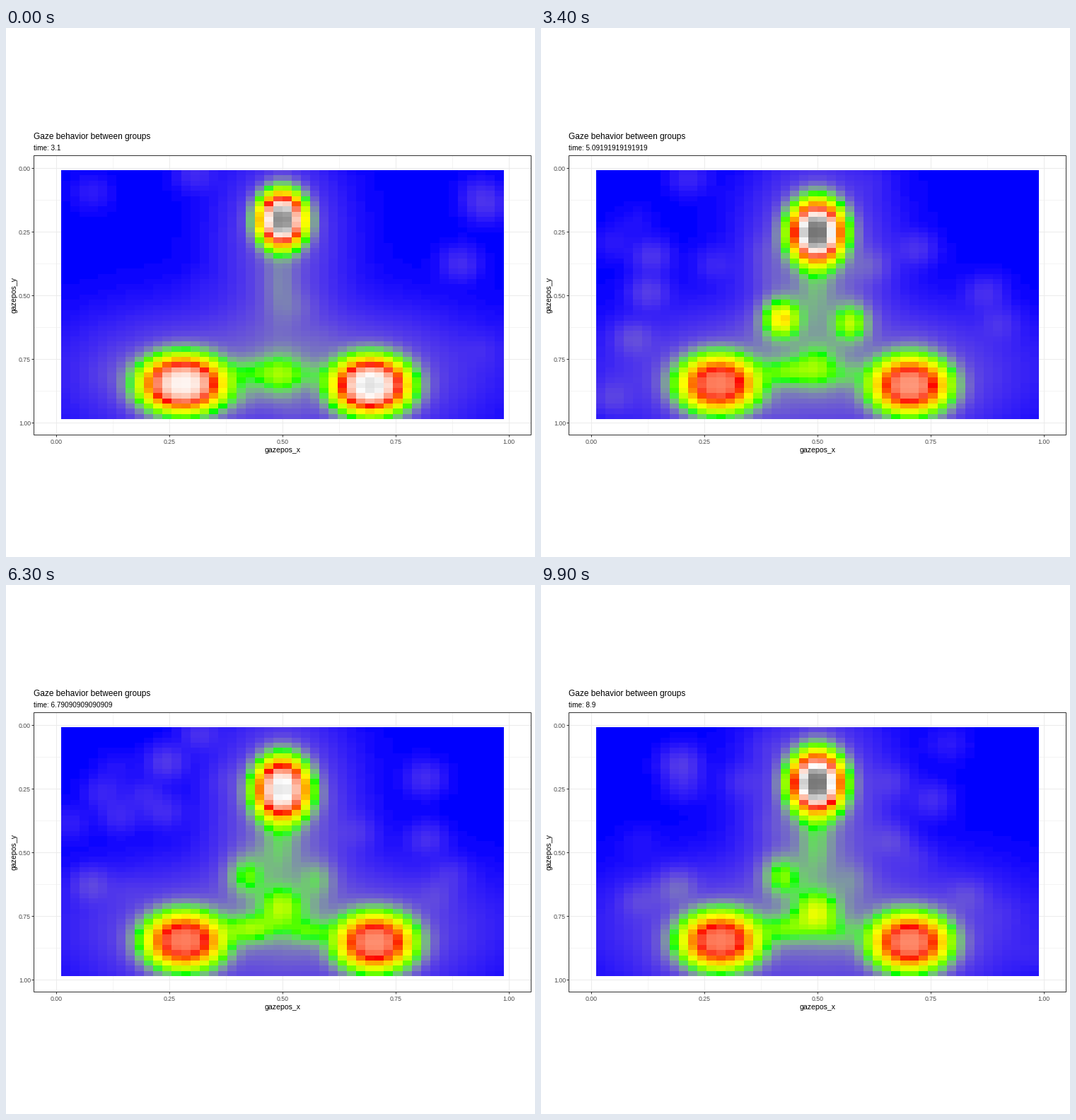
These frames come from a looping animation (748 px wide and 748 px high, 10000 ms). A matplotlib script:

```python
import numpy as np
import matplotlib.pyplot as plt
from matplotlib.animation import FuncAnimation
from matplotlib.patches import Rectangle

SIZE, DPI, FRAMES = 748, 100, 100
PX = 72 / DPI  # points per pixel
plt.rcParams["font.family"] = "Liberation Sans"

# ---- colour scale: named colours mixed in CIELAB
RGB2XYZ = np.array([[.4124, .3576, .1805], [.2126, .7152, .0722], [.0193, .1192, .9505]])
WHITE = RGB2XYZ.sum(axis=1)


def to_lab(rgb):
    lin = np.where(rgb > .04045, ((rgb + .055) / 1.055) ** 2.4, rgb / 12.92)
    t = lin @ RGB2XYZ.T / WHITE
    f = np.where(t > .008856, np.cbrt(t), 7.787 * t + 16 / 116)
    return np.stack([116 * f[:, 1] - 16, 500 * (f[:, 0] - f[:, 1]),
                     200 * (f[:, 1] - f[:, 2])], axis=1)


def to_rgb(lab):
    fy = (lab[:, 0] + 16) / 116
    f = np.stack([fy + lab[:, 1] / 500, fy, fy - lab[:, 2] / 200], axis=1)
    t = np.where(f > .2069, f ** 3, (f - 16 / 116) / 7.787)
    lin = np.clip((t * WHITE) @ np.linalg.inv(RGB2XYZ).T, 0, 1)
    return np.clip(np.where(lin > .0031308, 1.055 * lin ** (1 / 2.4) - .055, 12.92 * lin), 0, 1)


def lab_ramp(names, n=1024):
    stops = to_lab(np.array([plt.matplotlib.colors.to_rgb(c) for c in names]))
    pos = np.linspace(0, 1, len(names))
    mix = [np.interp(np.linspace(0, 1, n), pos, channel) for channel in stops.T]
    return to_rgb(np.stack(mix, axis=1))


LUT = lab_ramp(["blue", "lime", "yellow", "red", "white", "black"])

# ---- density field, positions in pixels
CELLS = 48
HEAT_L, HEAT_R, HEAT_T, HEAT_B = 78, 704, 201, 553
mid = (np.arange(CELLS) + .5) / CELLS
GX, GY = np.meshgrid(HEAT_L + (HEAT_R - HEAT_L) * mid, HEAT_T + (HEAT_B - HEAT_T) * mid)


def bump(x, y, w, h, amp, power=1.0):
    """Bell with half-widths w and h; a higher power flattens the top."""
    q = ((GX - x) / w) ** 2 + ((GY - y) / h) ** 2
    return amp * np.exp(-np.log(2) * q ** power)


def ease(s, *points):
    t, v = zip(*points)
    return np.interp(s, t, v)


def hot_spots(s):
    """Face at the top and the two hands below."""
    grow = ease(s, (0, 0), (.3, 1))
    top_y = ease(s, (0, 271), (.3, 289), (.8, 289), (1, 280))
    top_amp = .87 + .055 * np.cos(2 * np.pi * (s - .2) / .95)
    left_amp = .67 + .12 * np.exp(-s / .08)
    right_amp = ease(s, (0, .82), (.2, .79), (.35, .69), (1, .68))
    return [(390, top_y, 32 + 5 * grow, 38 + 5 * grow, top_amp),
            (250 + 3 * s, 503, 57 - 4 * grow, 38, left_amp),
            (516 + 6 * grow, 505, 52, 38, right_amp)]


def soft_spots(s):
    """Glances between the hot spots, and the haze around them."""
    haze = ease(s, (0, .03), (.2, .06))
    left = ease(s, (.2, 0), (.34, .40), (.63, .17), (1, .19))
    right = ease(s, (.2, 0), (.34, .26), (.63, .10), (1, .04))
    mid_y = ease(s, (0, 490), (.2, 474), (.4, 482), (.63, 456), (1, 463))
    mid_amp = ease(s, (0, .20), (.2, .14), (.63, .22), (.75, .29), (1, .28))
    return [(391, 400, 62, 110, haze),
            (391, 480, 210, 55, .03),
            (388, 362, 19, 45, .05 + .04 * s),
            (340, 411, 20, 21, left),
            (438, 417, 19, 20, right),
            (389, mid_y, 24, 23, mid_amp),
            (345, 486, 28, 16, ease(s, (0, .11), (.63, .21), (1, .16))),
            (430, 490, 26, 14, .09 + .05 * np.sin(2 * np.pi * (s - .4)))]


# stray glances: short-lived, rare in the upper right
rng = np.random.default_rng(7)
STRAYS = [(b, x, y, a) for b, x, y, a in zip(rng.uniform(-8, FRAMES + 8, 220),
                                             rng.uniform(80, 700, 220),
                                             rng.uniform(205, 550, 220),
                                             rng.uniform(.012, .035, 220))
          if x < 480 or y > 390 or rng.random() < .35]


def density(i):
    s = i / (FRAMES - 1)
    hot, soft = 0, 0
    for x, y, w, h, amp in hot_spots(s):
        hot = hot + bump(x, y, w, h, amp, 1.6)
        soft = soft + bump(x, y, 1.7 * w, 1.7 * h, .035)
    for spot in soft_spots(s):
        soft = soft + bump(*spot)
    for born, x, y, amp in STRAYS:
        life = 1 - abs(i - born) / 7
        if life > 0:
            soft = soft + bump(x, y, 21, 18, amp * life)
    return hot + soft * np.clip(1 - 2 * hot, 0, 1)


def heat(i):
    v = np.clip(density(i), 0, 1)
    return LUT[np.rint(v * (len(LUT) - 1)).astype(int)]


# ---- plot furniture
fig = plt.figure(figsize=(SIZE / DPI, SIZE / DPI), dpi=DPI, facecolor="white")
ax = fig.add_axes([0, 0, 1, 1])
ax.axis("off")
L, R, T, B = 39.5, 742.5, 180, 575
X0, XW, Y0, YH = 71.3, 640, 197.6, 360


def line(xs, ys, color, width=1.0):
    ax.plot(xs, ys, color=color, lw=width * PX, zorder=1, solid_capstyle="butt")


def label(x, y, s, px, color="black", va="baseline", **kw):
    return ax.text(x, y, s, fontsize=px * PX, color=color, va=va, **kw)


for k in range(9):
    f = k / 8
    x, y = X0 + XW * f, Y0 + YH * f
    major = k % 2 == 0
    line([x, x], [T, B], "#ebebeb", 1 if major else .5)
    line([L, R], [y, y], "#ebebeb", 1 if major else .5)
    if major:
        line([x, x], [B, B + 3], "#333333")
        line([L - 3, L], [y, y], "#333333")
        label(x, 588, f"{f:.2f}", 8.8, "#4d4d4d", ha="center")
        label(35, y + 4, f"{f:.2f}", 8.8, "#4d4d4d", ha="right")

ax.add_patch(Rectangle((L, T), R - L, B - T, fill=False, ec="#333333", lw=PX, zorder=4))
label(39, 157, "Gaze behavior between groups", 11.9)
clock = label(39, 173, "", 9.95)
label(391, 600, "gazepos_x", 10.5, ha="center")
label(12, 377, "gazepos_y", 10.5, ha="center", va="center", rotation=90)

img = ax.imshow(heat(0), extent=(HEAT_L, HEAT_R, HEAT_B, HEAT_T),
                interpolation="nearest", aspect="auto", zorder=3)
ax.set_xlim(0, SIZE)
ax.set_ylim(SIZE, 0)


def draw(i):
    img.set_data(heat(i))
    clock.set_text(f"time: {3.1 + 5.8 * i / (FRAMES - 1):.15g}")
    return img, clock


anim = FuncAnimation(fig, draw, frames=FRAMES, interval=100, repeat=True, repeat_delay=0)
plt.show()
```
